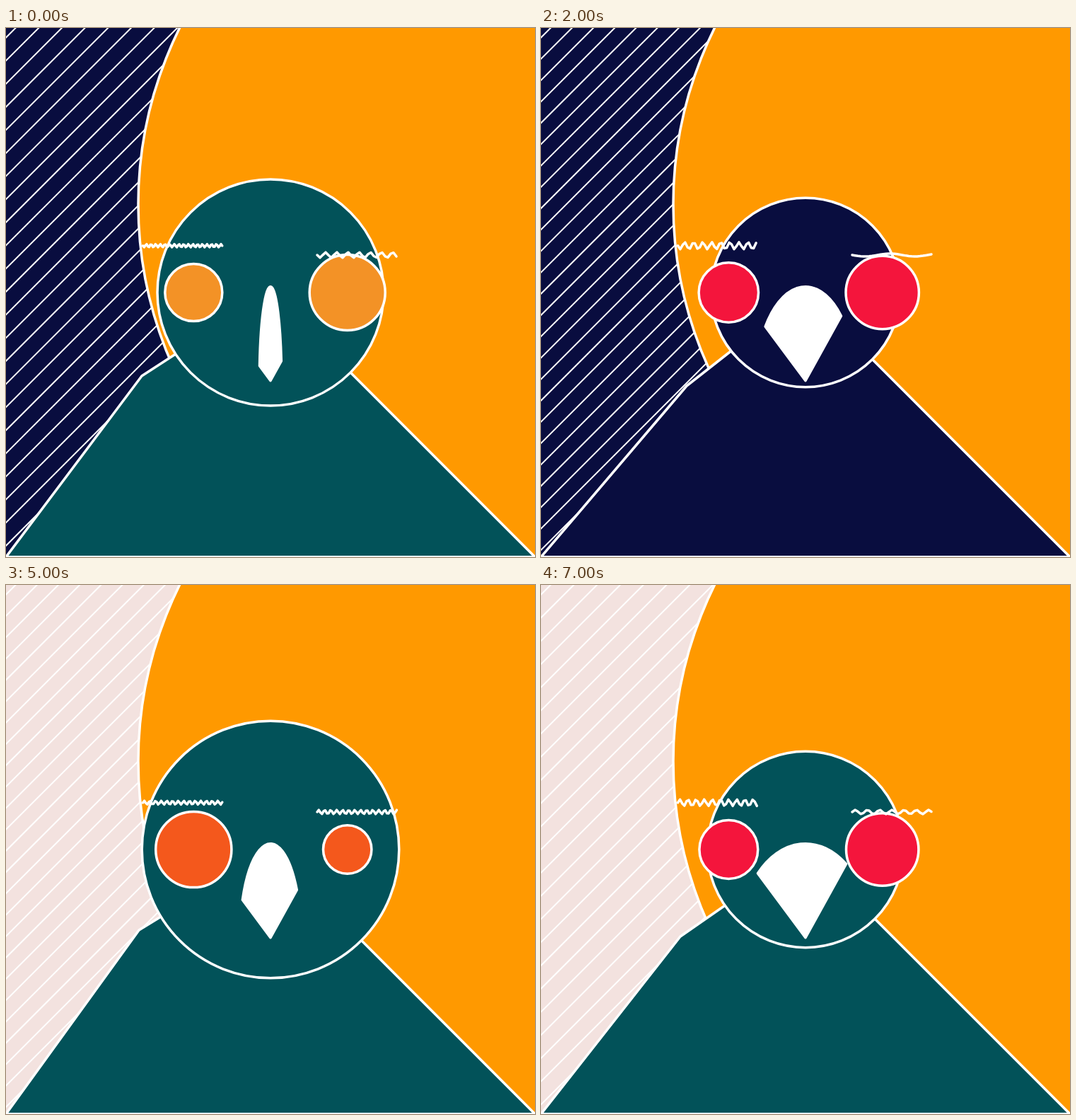
Write an HTML page with a canvas that moves like this. It is 748x748 px and loops after 8000 ms.

```html
<!DOCTYPE html>
<html lang="en">
<head>
<meta charset="utf-8">
<title>Bird portrait</title>
<style>
  html, body { margin: 0; width: 100%; height: 100%; overflow: hidden; background: #ff9900; }
  canvas { display: block; }
</style>
</head>
<body>
<canvas id="stage" width="748" height="748"></canvas>
<script>
const SIZE = 748, MID = SIZE / 2, TURN = 2 * Math.PI;
const HOLD = 1000, LINE = 3.5, CHEEK_X = 108.7;
const NAVY = '#090d3f', PINK = '#f3e2df', SUN = '#ff9900';
const PINE = '#025259', TEAL = '#007271', BLUE = '#124abf';
const AMBER = '#f39226', RED = '#f4153c', CORAL = '#f4581c';

// cheeks: radii; waves: brow wavelengths, both left then right
const bird = (body, blush, gap, shoulder, head, beak, cheeks, waves) =>
  ({ body, blush, gap, shoulder, head, beak, cheeks, waves });

// A bird halfway between two others, in the colours of the first
function between(a, b) {
  const mean = (x, y) => (x + y) / 2;
  const blend = (x, y) => Array.isArray(x) ? x.map((v, i) => mean(v, y[i]))
    : typeof x === 'number' ? mean(x, y) : x;
  return Object.fromEntries(Object.keys(a).map(key => [key, blend(a[key], b[key])]));
}

const keys = [
  bird(PINE, AMBER, 32.66, 192, 160, 15.7, [40.5, 53.5], [6.6, 15.8]),
  bird(NAVY, RED, 30.19, 206, 133.8, 69.5, [42.2, 51.7], [12.8, 71]),
  bird(TEAL, AMBER, 27.6, 209, 111.8, 44, [51.5, 36.5], [28, 25.5]),
  bird(BLUE, AMBER, 29.45, 200.5, 117, 125, [48.6, 54.6], [19.2, 10.6]),
  bird(PINE, CORAL, 30.19, 188, 181.8, 43.3, [53.6, 34.2], [8, 8.5]),
  bird(PINE, RED, 32.78, 197, 138.7, 92.5, [41.4, 51.2], [11.5, 17.3])
];
const [first, second, ...rest] = keys;
const last = rest.pop();
const birds = [first, between(first, second), second, ...rest, between(rest.at(-1), last), last];

const ctx = document.getElementById('stage').getContext('2d');

function trace(points) {
  ctx.beginPath();
  points.forEach(([x, y]) => ctx.lineTo(x, y));
}

function paint(fill) {
  ctx.closePath();
  ctx.fillStyle = fill;
  ctx.fill();
  ctx.stroke();
}

function disc(x, y, r, fill) {
  ctx.beginPath();
  ctx.arc(x, y, r, 0, TURN);
  paint(fill);
}

function stripes(gap) {
  ctx.lineWidth = 2;
  for (let d = 13.5; d < SIZE * 1.5; d += gap) {
    trace([[-5, d + 5], [d + 5, -5]]);
    ctx.stroke();
  }
  ctx.lineWidth = LINE;
}

// Slice of an ellipse between two edges of fixed slope
function beak(rx) {
  const ry = 133, y = SIZE * 2 / 3;
  const from = Math.atan2(-1.345 / ry, -1 / rx);
  const to = Math.atan2(-1.81 / ry, 1 / rx);
  ctx.beginPath();
  ctx.moveTo(MID, y);
  ctx.ellipse(MID, y, rx, ry, 0, from, to);
  paint('#fff');
}

// Coarsely sampled wave, tallest at medium wavelengths
function brow(x, y, wave, rise) {
  const height = 2 + 3 * Math.exp(-(((wave - 13) / 4) ** 2));
  const step = Math.min(wave * 0.27, 4);
  const points = [];
  for (let d = 0; d <= 114; d += step) {
    points.push([x + d, y - rise * height * Math.sin(d / wave * TURN)]);
  }
  trace(points);
  ctx.stroke();
}

function draw(b, night) {
  ctx.fillStyle = night ? NAVY : PINK;
  ctx.fillRect(0, 0, SIZE, SIZE);
  ctx.strokeStyle = '#fff';
  ctx.lineJoin = ctx.lineCap = 'round';
  stripes(b.gap);
  disc(SIZE, SIZE / 3, SIZE * 0.75, SUN);
  trace([[0, SIZE], [b.shoulder, b.shoulder + 300], [MID, MID], [SIZE, SIZE]]);
  paint(b.body);
  disc(MID, MID, b.head, b.body);
  beak(b.beak);
  b.cheeks.forEach((r, i) => disc(MID + (i ? CHEEK_X : -CHEEK_X), MID, r, b.blush));
  b.waves.forEach((wave, i) => brow(i ? 440 : 193.5, i ? 321 : 307.8, wave, night ? -1 : 1));
}

const begin = performance.now();
let shown = -1;

function tick() {
  const index = Math.floor((performance.now() - begin) / HOLD) % birds.length;
  if (index !== shown) {
    shown = index;
    draw(birds[index], index < birds.length / 2);
  }
  requestAnimationFrame(tick);
}
tick();
</script>
</body>
</html>
```
